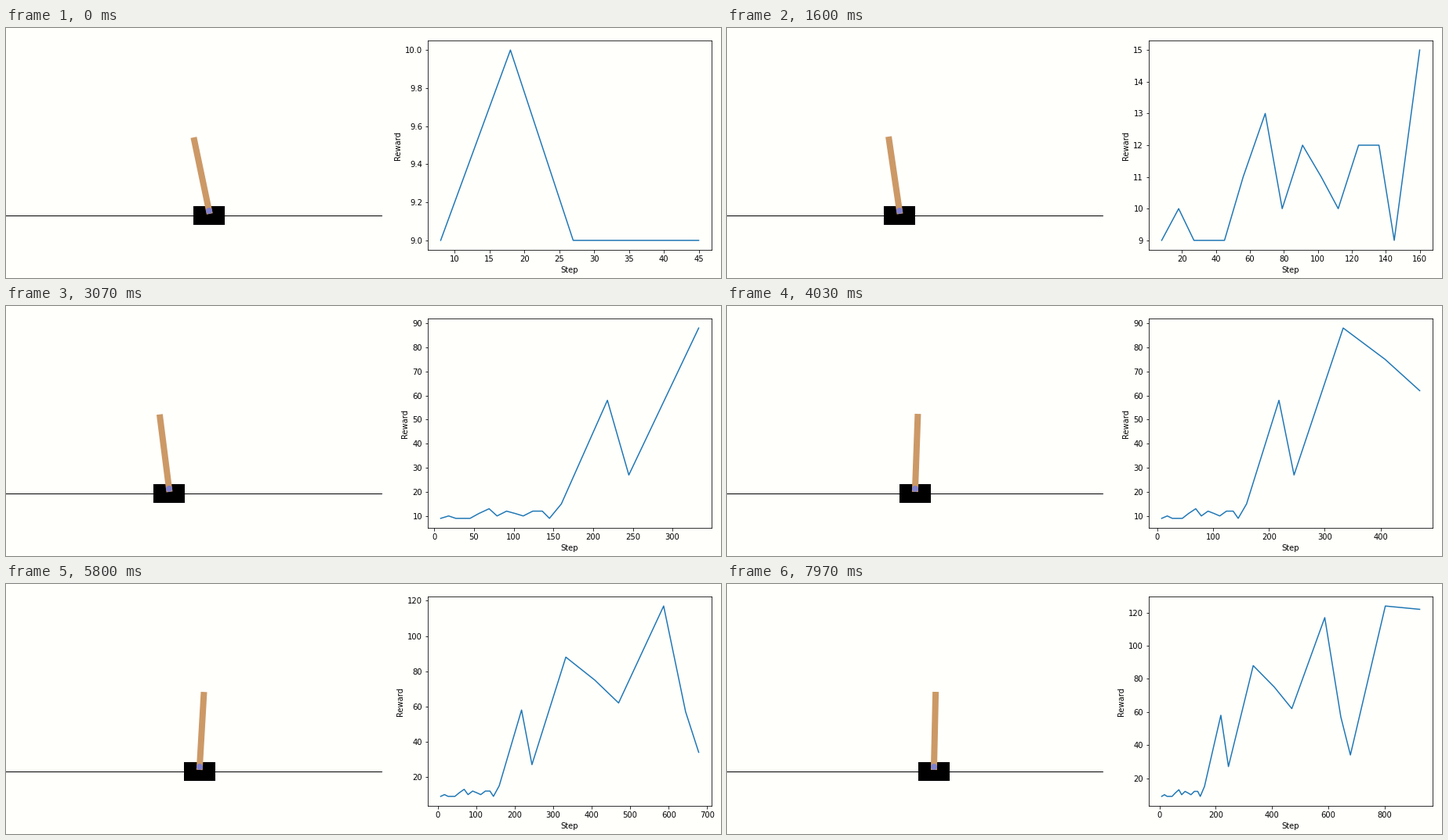
A matplotlib script for the animation above (8 s loop, 912 px wide and 320 px high).

```python
import numpy as np
import matplotlib.pyplot as plt
from matplotlib.animation import FuncAnimation
from matplotlib.patches import Circle, Polygon, Rectangle

W, H, DPI = 912, 320, 72
FRAMES, LOOP = 240, 8000
RATE = 4.4      # simulation steps per frame
PAUSE = 5       # steps lost while the plot is redrawn
DONE = 5        # episodes finished when the loop starts
LEAD = 1 / 3    # show each pose slightly into its frame
MAX_STEPS = 500
MID, TRACK_Y, AXLE_Y = 240, 240, 234
PAPER = "#fffffc"

rewards = [9, 10, 9, 9, 9, 11, 13, 10, 12, 11, 10, 12, 12, 9, 15,
           58, 27, 88, 75, 62, 117, 57, 34, 124, 122]
steps = np.cumsum(rewards) - 1
lengths = rewards + [MAX_STEPS]

# How far the cart travels in an episode, in px
reach = {15: -20, 17: -17, 18: -80, 25: 400}


def pose(ep, step):
    """Cart centre in px and pole angle in degrees."""
    p = step / lengths[ep]
    start = np.cos(2 * np.pi * (ep - 24.5) / 6.5)
    if lengths[ep] < 20:    # untrained: one steady push, pole falls back
        return MID + 3 * start + 17.5 * p ** 2, -11.8 * p ** 2
    travel = reach.get(ep, 38)
    lean = 12 * p ** 2 + 2.5 * np.sin(np.pi * p)
    return MID + 8 * start + travel * p ** 1.6, np.sign(travel) * lean


def state(frame):
    """Number of finished episodes, cart centre and pole angle."""
    clock = (frame + LEAD) * RATE
    ep = DONE
    while clock >= PAUSE + lengths[ep]:
        clock -= PAUSE + lengths[ep]
        ep += 1
    if clock < PAUSE:
        return ep, *pose(ep - 1, lengths[ep - 1])
    return ep, *pose(ep, clock - PAUSE)


fig = plt.figure(figsize=(W / DPI, H / DPI), dpi=DPI, facecolor=PAPER)

stage = fig.add_axes([0, 0, 1, 1])
stage.set(xlim=(0, W), ylim=(H, 0))
stage.axis("off")
cart = Rectangle((0, TRACK_Y - 12), 40, 24, fc="black", lw=0, aa=False)
pole = Polygon(np.zeros((4, 2)), fc=(0.8, 0.6, 0.4), lw=0)
axle = Circle((0, AXLE_Y), 4, fc=(0.5, 0.5, 0.8), lw=0)
track = Rectangle((0, TRACK_Y), 480, 1, fc="black", lw=0, aa=False)
for part in (cart, pole, axle, track):
    stage.add_patch(part)

ax = fig.add_axes([538 / W, 36 / H, 362 / W, 268 / H], facecolor=PAPER)
ax.set_xlabel("Step")
ax.set_ylabel("Reward")
curve, = ax.plot([], [])


def draw(frame):
    done, x, angle = state(frame)
    x = round(x)
    cart.set_x(x - 20)
    axle.center = (x, AXLE_Y)
    s, c = np.sin(np.radians(angle)), np.cos(np.radians(angle))
    corners = [(-4, -4), (-4, 96), (4, 96), (4, -4)]
    pole.set_xy([(x + a * c + b * s, AXLE_Y + a * s - b * c)
                 for a, b in corners])
    curve.set_data(steps[:done], rewards[:done])
    ax.relim()
    ax.autoscale_view()
    return cart, pole, axle, curve


anim = FuncAnimation(fig, draw, frames=FRAMES, init_func=lambda: draw(0),
                     interval=LOOP / FRAMES, repeat=True, repeat_delay=0,
                     blit=False)
plt.show()
```
